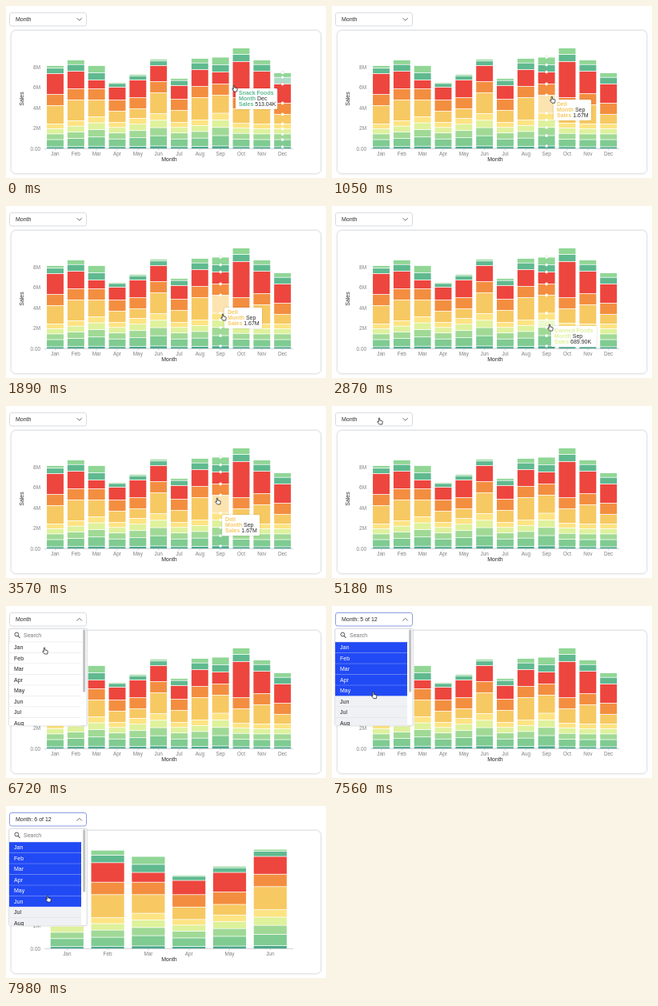
These frames come from a looping animation (400x215 px, 8000 ms). An HTML page:

```html
<!DOCTYPE html>
<html lang="en">
<head>
<meta charset="utf-8">
<title>Sales by month</title>
<style>
html, body { margin: 0; width: 100%; height: 100%; overflow: hidden; background: #fff; }
svg { display: block; width: 100%; height: 100%; }
text { font: 7px "Liberation Sans", Arial, sans-serif; fill: #2b2b2b; white-space: pre; }
.tick { font-size: 6.4px; fill: #808080; }
.mid { text-anchor: middle; }
.end { text-anchor: end; }
.bold { font-weight: bold; }
.shadow { filter: drop-shadow(0 .5px 1px rgba(0,0,0,.16)); }
</style>
</head>
<body>
<svg viewBox="0 0 400 215">
  <defs><clipPath id="panel"><rect x="3" y="28" width="98" height="121.5"/></clipPath></defs>
  <rect class="shadow" x="6.5" y="30.5" width="387" height="179" rx="6" fill="#fff" stroke="#dfe2e7" stroke-width=".8"/>
  <text class="mid" x="204" y="194">Month</text>
  <text class="mid" transform="translate(22 116) rotate(-90)">Sales</text>
  <g id="chart"></g><g id="tip"></g><g id="menu"></g>
  <path id="hand" d="M-.9 1q0-1.2.9-1.2t.9 1.2v2.7l3.2.7q1.3.3 1.2 1.6l-.7 4H.3L-2.6 6.5q-.5-1.1.5-1.2l1.2.9z" fill="#fff" stroke="#111" stroke-width=".9"/>
</svg>
<script>
const LOOP = 8000, BASE = 178.5, PX_PER_M = 12.75;
const COLORS = ["#4ba88c", "#7fcb91", "#a0d996", "#def19b", "#fde483", "#f7c963",
                "#f38e40", "#ed463e", "#60b98f", "#90d696"];
const CANNED = 3, DELI = 5, SNACKS = 8, SEP = 8, DEC = 11;

// Heights at which the yellow segment starts, the red one starts and ends, and the bar ends
const EDGES = {
  Jan: [31, 68, 94, 104], Feb: [35, 75, 97, 111], Mar: [40, 75, 86, 104], Apr: [33, 61, 77, 83],
  May: [38, 64, 86, 93], Jun: [44, 84, 104, 112], Jul: [33, 62, 79, 88], Aug: [36, 78, 99, 113],
  Sep: [44.5, 81, 96, 114.5], Oct: [32, 64, 109, 126], Nov: [31, 69, 97, 111], Dec: [31, 57, 81, 95]
};
const MONTHS = Object.keys(EDGES);
const LOW_SHARES = [0.08, 0.29, 0.23, 0.21, 0.19], ORANGE = 14;

// Segment heights, bottom to top
function stack([low, mid, high, top]) {
  const cap = top - high, teal = cap * (0.9 - 0.022 * cap);
  return [...LOW_SHARES.map(s => s * low), mid - low - ORANGE, ORANGE, high - mid, teal, cap - teal];
}
const STACKS = Object.values(EDGES).map(stack);

// Hovered segment: start time, month, series, name, value
const HOVERS = [
  [0, DEC, SNACKS, "Snack Foods", "513.04K"],
  [140, SEP, DELI, "Deli", "1.67M"],
  [2450, SEP, CANNED, "Canned Foods", "689.90K"],
  [3290, SEP, DELI, "Deli", "1.67M"]
];
const LEAVE = 3990, OPEN = 5670, FIRST_PICK = 6860, PICK_GAP = 168, FILTER = 7800;
const TIP_LAG = 250;

// Pointer keys: time, x, y
const HAND = [[70, 285, 99], [280, 275, 113], [980, 275, 113], [1500, 271, 118], [1890, 271, 135],
  [2870, 272, 148], [3080, 272, 148], [3570, 264, 115], [3850, 263, 112], [4800, 59, 15],
  [6160, 59, 15], [6650, 48, 52], [FIRST_PICK, 48, 52], [7700, 52, 112]];

const $ = id => document.getElementById(id);
const clamp = (v, max = 1) => Math.max(0, Math.min(max, v));
const mix = (a, b, p) => a + (b - a) * p;
const rect = (x, y, w, h, fill, more = "") =>
  `<rect x="${x}" y="${y}" width="${w}" height="${h}" fill="${fill}" ${more}/>`;
const text = (x, y, s, cls = "", fill = "") =>
  `<text x="${x}" y="${y}" class="${cls}"${fill && ` style="fill:${fill}"`}>${s}</text>`;
const line = (d, color, w = 0.6) => `<path d="${d}" fill="none" stroke="${color}" stroke-width="${w}"/>`;

function handAt(t) {
  const i = HAND.findIndex(k => k[0] > t);
  if (i < 0) return HAND[HAND.length - 1].slice(1);
  if (!i) return HAND[0].slice(1);
  const [t0, x0, y0] = HAND[i - 1], [t1, x1, y1] = HAND[i];
  const p = (t - t0) / (t1 - t0), e = p * p * (3 - 2 * p);
  return [mix(x0, x1, e), mix(y0, y1, e)];
}

function chart(t, hover) {
  const p = 1 - (1 - clamp((t - FILTER) / 170)) ** 3;
  const step = mix(25.83, 50.8, p), left = mix(48.6, 50.9, p), scale = mix(1, 1.11, p);
  const count = t < FILTER ? 12 : 6, w = step * 0.81;
  let out = line(`M48 ${BASE}H359`, "#b5b9c0"), dots = "";
  for (let m = 0; m <= 8; m += 2)
    out += text(43, BASE - m * PX_PER_M * scale + 2.3, m ? m + "M" : "0.00", "tick end");
  for (let i = 0; i < count; i++) {
    const x = left + step * (i + 0.5), hovered = hover && hover[1] === i;
    let y = BASE;
    STACKS[i].forEach((height, s) => {
      const h = height * scale, faded = hovered && hover[2] === s;
      y -= h;
      out += rect(x - w / 2, y + 0.4, w, h - 0.8, COLORS[s], faded ? 'opacity=".5"' : "");
      if (hovered) dots += `<circle cx="${x}" cy="${y}" r="2" fill="#fff" stroke="${COLORS[s]}" stroke-width=".3"/>`;
    });
    out += line(`M${x} ${BASE}v2`, "#b5b9c0") + text(x, 187, MONTHS[i], "tick mid");
  }
  return out + dots;
}

function tooltip(t, hover) {
  if (!hover) return "";
  const [, month, series, name, value] = hover, [hx, hy] = handAt(t - TIP_LAG);
  const x = hx + 2, y = hy + 4;
  const row = (i, key, val) => `<text x="${x + 4}" y="${y + 8.2 + i * 6.9}">` +
    `<tspan class="bold" style="fill:${COLORS[series]}">${key}</tspan> ${val}</text>`;
  return rect(x, y, Math.max(47, name.length * 4.75), 26, "#fff", 'rx="1.5" class="shadow"') +
    row(0, name, "") + row(1, "Month", MONTHS[month]) + row(2, "Sales", value);
}

function menu(t) {
  const open = t >= OPEN, picked = clamp(Math.floor((t - FIRST_PICK) / PICK_GAP) + 1, 6);
  let out = rect(4.5, 8.5, 96, 16.5, "#fff", `rx="2.5" stroke="${picked ? "#7083d8" : "#d0d3d9"}" stroke-width=".8"`) +
    text(12, 19, picked ? `Month: ${picked} of 12` : "Month") +
    line(open ? "M88.5 18.5l3.2-3.2 3.2 3.2" : "M88.5 15l3.2 3.2 3.2-3.2", "#707070", 1);
  if (!open) return out;
  out += rect(4, 28.5, 97, 121, "#fff", 'rx="1.5" class="shadow" stroke="#d3d6db" stroke-width=".7"') +
    '<circle cx="13.3" cy="35.5" r="2.4" fill="none" stroke="#555"/>' + line("M15 37.3l2.5 2.5", "#555", 1.1) +
    text(22, 39, "Search", "", "#757575") + line("M4 45.2H95", "#c9ccd2");
  let rows = "";
  for (let i = 0; i < 8; i++) {
    const y = 45.2 + i * 13.5, on = i < picked;
    rows += rect(4, y, 90, 13.5, on ? "#214af5" : picked ? "#f0f1f5" : "#fff") +
      line(`M4 ${y + 13.5}H94`, on ? "#a3b2f5" : "#c9ccd2") +
      text(10, y + 9.2, MONTHS[i], "", on ? "#fff" : "#222");
  }
  return out + `<g clip-path="url(#panel)">${rows}</g>` + rect(96.2, 29.5, 3, 78, "#bfc1c5", 'rx="1"');
}

function draw(now) {
  const t = now % LOOP;
  const hover = t < LEAVE ? HOVERS.filter(h => t >= h[0]).pop() : null;
  $("chart").innerHTML = chart(t, hover);
  $("tip").innerHTML = tooltip(t, hover);
  $("menu").innerHTML = menu(t);
  $("hand").setAttribute("transform", `translate(${handAt(t)}) scale(.8)`);
}

const start = performance.now();
function tick() {
  draw(performance.now() - start);
  requestAnimationFrame(tick);
}
tick();
</script>
</body>
</html>
```
